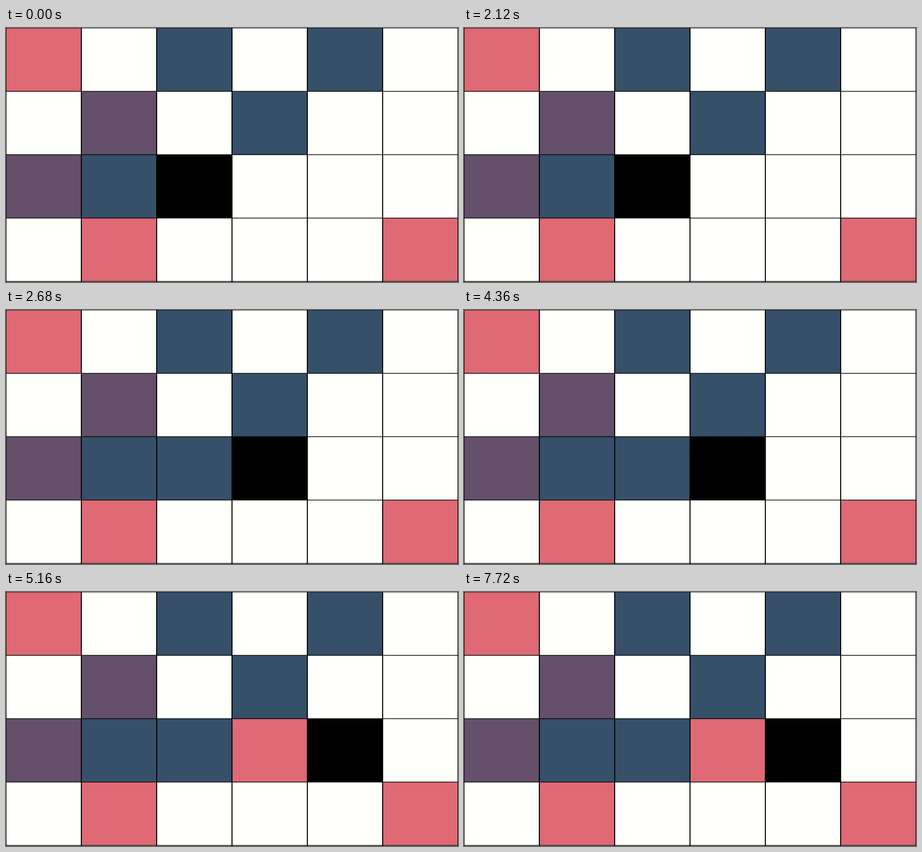
Animation of 900x506 px, one loop 8000 ms. Source, as an HTML page:

```html
<!DOCTYPE html>
<html lang="en">
<head>
<meta charset="utf-8">
<title>Grid walk</title>
<style>
  html, body { margin: 0; width: 100%; height: 100%; overflow: hidden; background: #fffffc; }
  svg { display: block; width: 900px; height: 506px; }
</style>
</head>
<body>
<svg id="stage" viewBox="0 0 900 506" xmlns="http://www.w3.org/2000/svg"></svg>
<script>
const NS = 'http://www.w3.org/2000/svg';
const LOOP = 8000, W = 150, H = 126.2, COLS = 6, LINE = 1.4;
const COLORS = { w: '#fffffc', r: '#df6974', b: '#365069', p: '#64506b', k: '#000' };
const ROWS = ['rwbwbw', 'wpwbww', 'pbkwww', 'wrwwwr'];

// The black cursor moves right and leaves a colour behind it.
const WALK = [
  { at: 2520, row: 2, col: 2, left: 'b' },
  { at: 5160, row: 2, col: 3, left: 'r' }
];

const stage = document.getElementById('stage');

function rect(x, y, w, h, fill) {
  const el = document.createElementNS(NS, 'rect');
  const attrs = { x, y, width: w, height: h, fill };
  for (const key in attrs) el.setAttribute(key, attrs[key]);
  return stage.appendChild(el);
}

rect(0, 0, 900, 506, COLORS.w);
const cells = ROWS.map((row, r) =>
  [...row].map((key, c) => rect(c * W, r * H, W, H, COLORS[key])));

for (let c = 1; c < COLS; c++) rect(c * W - 1, 0, 2, 506, '#000');
for (let r = 0; r <= ROWS.length; r++) rect(0, r * H - LINE / 2, 900, LINE, '#000');
rect(0, 0, 1, 506, '#000');
rect(899, 0, 1, 506, '#000');

function render(t) {
  const grid = ROWS.map(row => [...row]);
  for (const step of WALK) {
    if (t < step.at) break;
    grid[step.row][step.col] = step.left;
    grid[step.row][step.col + 1] = 'k';
  }
  grid.forEach((row, r) => row.forEach((key, c) =>
    cells[r][c].setAttribute('fill', COLORS[key])));
}

const start = performance.now();
function tick() {
  render((performance.now() - start) % LOOP);
  requestAnimationFrame(tick);
}
render(0);
requestAnimationFrame(tick);
</script>
</body>
</html>
```
